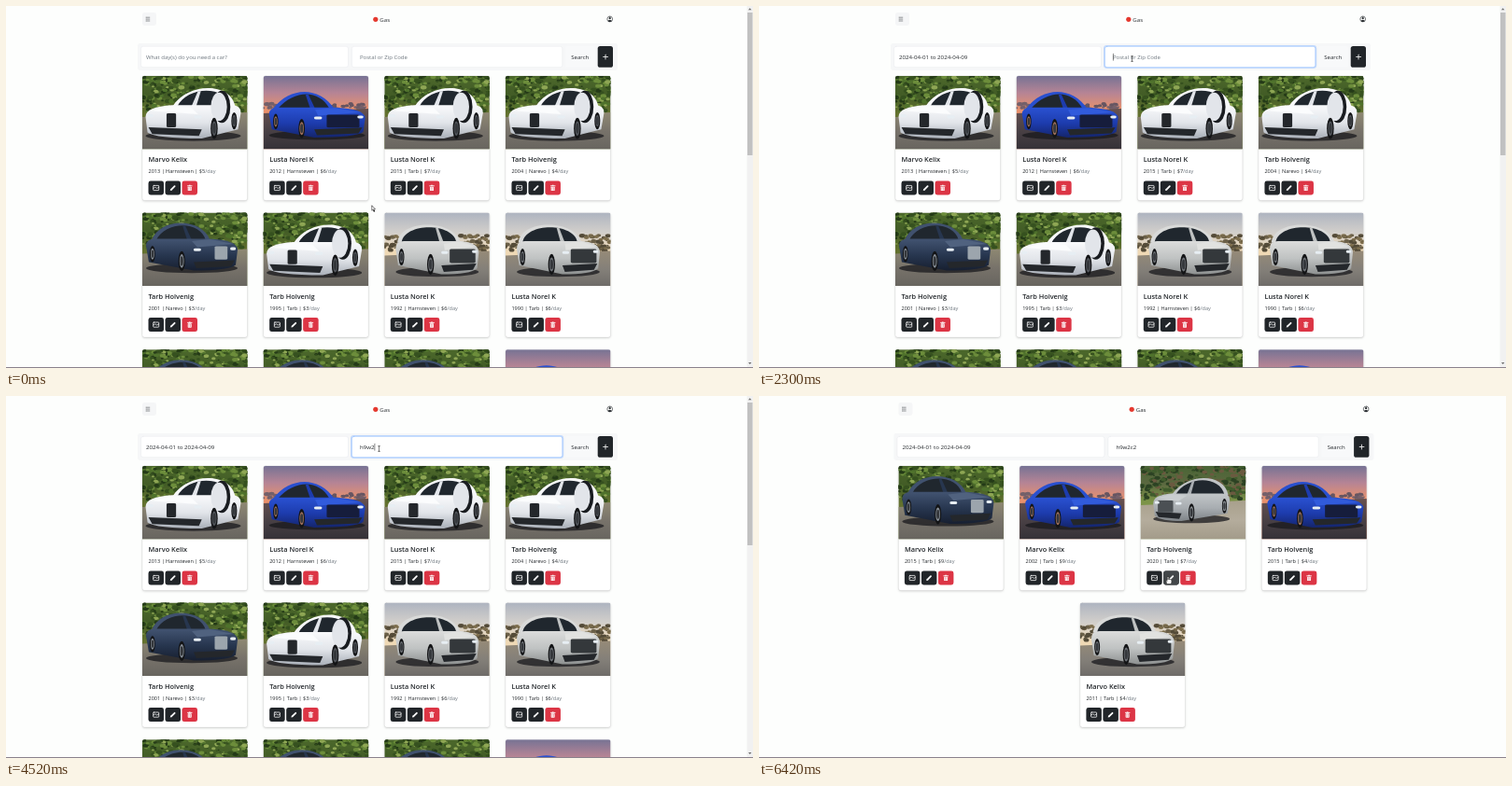
An HTML page with a canvas for the animation above (6.45 s loop, 800x388 px).

```html
<!DOCTYPE html>
<html lang="en">
<head>
<meta charset="utf-8">
<title>Car rental search</title>
<style>
html, body { margin: 0; width: 100%; height: 100%; overflow: hidden; background: #fdfefd; }
canvas { display: block; width: 800px; height: 388px; }
</style>
</head>
<body>
<canvas id="stage"></canvas>
<script>
const W = 800, H = 388, LOOP = 6450;
const DARK = '#212529', RED = '#dc3545', BLUE = '#569ff7', GREY = '#6c757d';
const dpr = window.devicePixelRatio || 1;
const stage = document.getElementById('stage');
let g = setup(stage);

function setup(canvas) {
  canvas.width = W * dpr;
  canvas.height = H * dpr;
  const c = canvas.getContext('2d');
  c.scale(dpr, dpr);
  return c;
}

// ---------- drawing helpers ----------
function text(str, x, y, size, color = DARK, weight = 400, align = 'left') {
  g.font = `${weight} ${size}px "Open Sans", "Noto Sans", sans-serif`;
  g.fillStyle = color;
  g.textAlign = align;
  g.fillText(str, x, y);
  return g.measureText(str).width;
}
function box(x, y, w, h, r, fill, line, lw = 0.5) {
  g.beginPath();
  g.roundRect(x, y, w, h, r);
  if (fill) { g.fillStyle = fill; g.fill(); }
  if (line) { g.strokeStyle = line; g.lineWidth = lw; g.stroke(); }
}
function oval(x, y, rx, ry, fill) {
  g.beginPath();
  g.ellipse(x, y, rx, ry, 0, 0, 7);
  g.fillStyle = fill;
  g.fill();
}
function trace(p) {
  g.beginPath();
  for (let i = 0; i < p.length; i += 2) g.lineTo(p[i], p[i + 1]);
}
function poly(fill, ...p) {
  trace(p);
  g.closePath();
  g.fillStyle = fill;
  g.fill();
}
function line(color, lw, ...p) {
  trace(p);
  g.strokeStyle = color;
  g.lineWidth = lw;
  g.lineJoin = g.lineCap = 'round';
  g.stroke();
}
function fade(y0, y1, colors) {
  const f = g.createLinearGradient(0, y0, 0, y1);
  colors.forEach((c, i) => f.addColorStop(i / (colors.length - 1), c));
  return f;
}
function shadow(blur, alpha, dy) {
  g.shadowBlur = blur * dpr;
  g.shadowOffsetY = dy * dpr;
  g.shadowColor = `rgba(0,0,0,${alpha})`;
}
function noShadow() { g.shadowColor = 'transparent'; }

function random(seed) {
  return () => (seed = (seed * 16807) % 2147483647) / 2147483647;
}

// ---------- pictures: one scene and one car, shaped by a few settings ----------
const PW = 112.5, PH = 78.5;
const FOREST = {
  sky: ['#4c682b', '#425c26', '#64722f'], ground: ['#8d8772', '#77726a', '#68655f'], horizon: 40,
  trees: ['#243a17', '#36511f', '#4f722c', '#6c8d3b', '#8ea654'], top: 0
};
const SUNSET = {
  sky: ['#777394', '#b58495', '#e8916c'], ground: ['#66504f', '#4a4145', '#353137'], horizon: 36,
  trees: ['#74606a', '#665561'], top: 29
};
const FIELD = {
  sky: ['#aeb4c0', '#d2cfcb', '#efd9b5'], ground: ['#958a78', '#848079', '#6f6c69'], horizon: 42,
  trees: ['#544b38', '#6b6048', '#7c6d4c'], top: 24
};
const YARD = {
  sky: ['#4a6535', '#5b6840', '#7c9448'], ground: ['#a9a18d', '#b4ac9c', '#a39b8a'], horizon: 38,
  trees: ['#2c4223', '#405c2d', '#6b5a40'], top: 0
};

// Cars face right unless flipped; roof, hood, belt and wheel are fractions of the car's own box.
const PICS = {
  coupe: {
    scene: FOREST, flip: true, x: 7, y: 13, w: 102, h: 54, belt: 0.37, tail: 0.06, roof: [0.1, 0.56],
    hood: 0.72, wheel: 0.28, paint: ['#f7f8fa', '#e2e5ea', '#a9afb8'], light: '#fbfcfd',
    grille: '#24272b', gx: 0.68, gw: 0.1, rim: '#50545a', scoop: 0.2
  },
  sedan: {
    scene: SUNSET, x: 6, y: 17, w: 103, h: 49, belt: 0.37, tail: 0.04, roof: [0.22, 0.52],
    hood: 0.68, wheel: 0.34, paint: ['#2950cf', '#1d3cae', '#14256c'], light: '#315bdc',
    grille: '#161d3c', gx: 0.6, gw: 0.34, rim: '#a0715d'
  },
  saloon: {
    scene: FOREST, x: 4, y: 11, w: 98, h: 51, belt: 0.36, tail: 0.06, roof: [0.16, 0.6],
    hood: 0.7, wheel: 0.39, paint: ['#40516e', '#27364f', '#171f30'], light: '#50627f',
    grille: '#9ca5ad', gx: 0.75, gw: 0.14, rim: '#8a929b'
  },
  suv: {
    scene: FIELD, x: 12, y: 13, w: 89, h: 53, belt: 0.36, tail: 0.02, roof: [0.05, 0.7],
    hood: 0.78, wheel: 0.42, paint: ['#d9dad9', '#bfc2c2', '#8d9090'], light: '#e1e2e0',
    grille: '#34383b', gx: 0.65, gw: 0.31, rim: '#6d7176'
  },
  hatch: {
    scene: YARD, flip: true, x: 17, y: 13, w: 82, h: 46, belt: 0.39, tail: 0.02, roof: [0.08, 0.56],
    hood: 0.76, wheel: 0.5, paint: ['#c0c4c6', '#a8adb1', '#7e8387'], light: '#c9cdcf',
    grille: '#4b5054', gx: 0.74, gw: 0.2, rim: '#8b9094'
  }
};

function drawScene({ sky, ground, horizon, trees, top }) {
  g.fillStyle = fade(0, horizon, sky);
  g.fillRect(0, 0, PW, PH);
  const rnd = random(97);
  for (let i = 0; i < (horizon - top) * 9; i++) {
    const x = rnd() * PW, y = top + rnd() * (horizon - top), r = 0.6 + rnd() * 1.6;
    oval(x, y, r * 1.5, r, trees[Math.floor(rnd() * trees.length)]);
  }
  poly(fade(horizon, PH, ground), 0, horizon + 4, PW, horizon - 1, PW, PH, 0, PH);
}

function wheel(x, y, size, rim) {
  oval(x, y, size * 0.33, size, '#131416');
  oval(x, y, size * 0.22, size * 0.68, rim);
  oval(x, y, size * 0.15, size * 0.48, '#35383c');
}

function cabin({ tail, roof, hood, belt }, inset, fill) {
  const peak = belt - (belt - inset) / 0.75;
  g.beginPath();
  g.moveTo(tail + inset, belt);
  g.bezierCurveTo(roof[0] + inset, peak, roof[1], peak, hood - inset, belt);
  g.fillStyle = fill;
  g.fill();
}

function drawCar(c) {
  const { belt, hood, paint } = c, corner = c.wheel + 0.13;
  g.save();
  if (c.flip) { g.translate(PW, 0); g.scale(-1, 1); }
  g.translate(c.x, c.y);
  g.scale(c.w, c.h);
  oval(0.5, 0.95, 0.5, 0.1, 'rgba(25,25,28,.75)');
  cabin(c, 0, paint[0]);
  cabin(c, 0.05, '#20272e');
  poly(paint[1], hood - 0.3, 0.06, hood - 0.27, 0.06, hood - 0.2, belt, hood - 0.25, belt);

  g.beginPath();
  g.moveTo(0, belt + 0.12);
  g.quadraticCurveTo(0, belt - 0.03, 0.1, belt - 0.03);
  g.lineTo(hood, belt - 0.03);
  g.quadraticCurveTo(1, belt, 1, belt + 0.2);
  g.lineTo(0.98, 0.88);
  g.quadraticCurveTo(0.9, 1, corner, 1);
  g.lineTo(0.03, 0.82);
  g.fillStyle = fade(belt, 1, paint);
  g.fill();

  poly(c.light, hood - 0.2, belt + 0.02, hood, belt - 0.02, 0.96, belt + 0.08, corner + 0.04, belt + 0.15);
  poly('#24272b', corner, 0.82, 0.97, 0.78, 0.93, 0.91, corner + 0.03, 0.95);
  box(c.gx, belt + 0.13, c.gw, 0.28, 0.02, c.grille);
  box(corner, belt + 0.17, 0.08, 0.06, 0.02, '#e7eef3');
  box(0.92, belt + 0.15, 0.06, 0.06, 0.02, '#e7eef3');
  if (c.scoop) {
    oval(c.scoop, belt, 0.09, 0.32, '#191c20');
    oval(c.scoop + 0.03, belt, 0.085, 0.28, paint[1]);
  }
  g.restore();

  const at = f => (c.flip ? PW - c.x - f * c.w : c.x + f * c.w);
  wheel(at(0.07), c.y + c.h * 0.65, c.h * 0.17, c.rim);
  wheel(at(c.wheel), c.y + c.h * 0.8, c.h * 0.21, c.rim);
}

// ---------- cards ----------
const KELIX = 'Marvo Kelix', NOREL = 'Lusta Norel K', TARB = 'Tarb Holvenig';
const FLEET = [
  ['coupe', KELIX, '2013 | Harnsteven | $5'], ['sedan', NOREL, '2012 | Harnsteven | $6'],
  ['coupe', NOREL, '2015 | Tarb | $7'], ['coupe', TARB, '2004 | Narevo | $4'],
  ['saloon', TARB, '2001 | Narevo | $3'], ['coupe', TARB, '1995 | Tarb | $3'],
  ['suv', NOREL, '1992 | Harnsteven | $6'], ['suv', NOREL, '1990 | Tarb | $6'],
  ['saloon'], ['saloon'], ['saloon'], ['sedan']
];
const FOUND = [
  ['saloon', KELIX, '2015 | Tarb | $9'], ['sedan', KELIX, '2002 | Tarb | $9'],
  ['hatch', TARB, '2020 | Tarb | $7'], ['sedan', TARB, '2015 | Tarb | $4'],
  ['suv', KELIX, '2011 | Tarb | $4']
];

function pictureIcon(x, y) {
  box(x - 3, y - 2.6, 6, 5.2, 0.6, null, '#fff', 0.75);
  line('#fff', 0.7, x - 3, y + 0.4, x - 1, y - 0.7, x + 1, y + 0.4, x + 3, y - 0.7);
}
function pencilIcon(x, y) {
  line('#fff', 1.8, x - 1.5, y + 1.6, x + 1.9, y - 1.8);
  poly('#fff', x - 3, y + 3, x - 2.3, y + 0.7, x - 0.7, y + 2.3);
}
function trashIcon(x, y) {
  line('#fff', 0.9, x - 2.4, y - 2.2, x + 2.4, y - 2.2);
  box(x - 0.9, y - 3.2, 1.8, 1, 0.3, '#fff');
  box(x - 2, y - 1.3, 4, 4.4, 0.6, '#fff');
  for (const d of [-0.8, 0.8]) line(RED, 0.4, x + d, y - 0.5, x + d, y + 2.2);
}
function button(x, y, fill, icon) {
  box(x, y, 16.5, 15, 2.4, fill);
  icon(x + 8.2, y + 7.5);
}

function card(x, y, [pic, title, info]) {
  shadow(2.5, 0.16, 1);
  box(x, y, PW, 133.5, 2.4, '#fff');
  noShadow();
  box(x, y, PW, 133.5, 2.4, null, 'rgba(0,0,0,.14)', 0.4);
  g.save();
  g.beginPath();
  g.roundRect(x, y, PW, PH, [2.2, 2.2, 0, 0]);
  g.clip();
  g.translate(x, y);
  drawScene(PICS[pic].scene);
  drawCar(PICS[pic]);
  g.restore();
  if (!title) return;
  const left = x + 6.5;
  text(title, left, y + 92.2, 7.35, DARK, 600);
  const w = text(info, left, y + 104.3, 5.55);
  text('/day', left + w, y + 104.3, 5.55, GREY);
  [pictureIcon, pencilIcon, trashIcon].forEach((icon, i) =>
    button(left + i * 18, y + 112.5, icon === trashIcon ? RED : DARK, icon));
}

function paintPage(cards, dx, scrolls) {
  g.fillStyle = '#fdfefd';
  g.fillRect(0, 0, W, H);
  g.save();
  g.translate(dx, 0);
  box(146, 7, 15, 14, 2.4, '#f5f6f7');
  for (let y = 12.2; y < 17; y += 1.9) line('#4d5256', 0.6, 149.8, y, 153.8, y);
  oval(395.8, 14.3, 2.6, 2.6, '#e5392f');
  text('Gas', 400.3, 16.6, 6.1);
  box(643.8, 11.1, 5.8, 5.8, 2.9, null, DARK, 0.6);
  oval(646.7, 13.2, 1.1, 1.1, DARK);
  oval(646.7, 15.9, 1.9, 1, DARK);
  box(141, 40, 514, 29, 2.4, '#f6f7f8');
  box(633.7, 43, 16.3, 22.8, 2.6, DARK);
  line('#fff', 0.8, 639.5, 54.5, 644.5, 54.5);
  line('#fff', 0.8, 642, 52, 642, 57);
  box(599, 43, 32, 22.8, 2.4, '#f8f9fa');
  text('Search', 605.3, 56.8, 6);
  cards.forEach((c, i) => {
    const row = Math.floor(i / 4), alone = cards.length - row * 4 === 1;
    card(alone ? 340.5 : 146 + (i % 4) * 129.65, 75 + row * 146.6, c);
  });
  g.restore();
  if (scrolls) {
    box(793.5, 0, 6.5, H, 0, '#f1f1f1');
    box(794, 7, 5.5, 153, 0, '#c1c1c1');
    for (const [y, d] of [[4.2, -2], [382, 2]]) poly('#6b6b6b', 795, y, 798.4, y, 796.7, y + d);
  }
  g.fillStyle = '#8a818c';
  g.fillRect(0, 387, W, 1);
}

function layer(paint) {
  const canvas = document.createElement('canvas'), main = g;
  g = setup(canvas);
  paint();
  g = main;
  return canvas;
}
const before = layer(() => paintPage(FLEET, 0, true));
const after = layer(() => paintPage(FOUND, 3.4, false));

// ---------- timeline ----------
const OPEN = 540, PICK = 1120, CLOSE = 1700, FOCUS = 2230, BLUR = 5560, RESULT = 5900;
const ZIP = 'h9w2c2', TYPE = 2950, KEY_GAP = 440;
const HOME = { x: 391.8, y: 214 };
const MOVES = [
  { from: 0, to: 460, x: 262, y: 56 },
  { from: 600, to: 1060, x: 289, y: 99 },
  { from: 1180, to: 1420, x: 307, y: 106.3 },
  { from: 1440, to: 1580, x: 306.5, y: 113 },
  { from: 1740, to: 2180, x: 399.5, y: 56.5 },
  { from: 5120, to: 5480, x: 612.3, y: 56.5 },
  { from: 5920, to: 6390, x: 438, y: 193.5 }
];

function pointer(t) {
  let { x, y } = HOME;
  for (const m of MOVES) {
    const u = Math.max(0, Math.min(1, (t - m.from) / (m.to - m.from))), e = u * u * (3 - 2 * u);
    x += (m.x - x) * e;
    y += (m.y - y) * e;
  }
  return [x, y];
}

// ---------- calendar ----------
const COL = 17.25, ROW = 15.6;
const cellX = (m, d) => (m ? 272.4 : 152.1) + d * COL;
const cellY = r => 99 + r * ROW;

function dayUnder(x, y) {
  const c = Math.round((x - cellX(1, 0)) / COL), r = Math.round((y - cellY(0)) / ROW);
  const day = r * 7 + c;
  return c >= 0 && c < 7 && r >= 0 && day >= 1 && day <= 30 ? day : 0;
}

function month(m, name, mid) {
  const wide = text(name, mid - 20, 77.3, 7, '#1a1a1a', 700);
  text('2024', mid - 18 + wide, 77.3, 6.8, '#555', 300);
  ['Sun', 'Mon', 'Tue', 'Wed', 'Thu', 'Fri', 'Sat'].forEach((d, i) =>
    text(d, cellX(m, i), 87.2, 4.6, '#666', 700, 'center'));
}

function calendar(picked, hover) {
  shadow(5, 0.18, 1);
  box(143.7, 66.5, 242, 118.3, 2, '#fff');
  noShadow();
  box(143.7, 66.5, 242, 118.3, 2, null, '#e4e4e4', 0.5);
  month(0, 'March', 202.3);
  month(1, 'April', 326);
  line('#555', 0.7, 377.3, 73.6, 379.5, 75.9, 377.3, 78.2);

  for (let d = 24; d <= 31; d++) {
    const x = cellX(0, (d - 24) % 7), y = cellY(d < 31 ? 4 : 5);
    if (d === 24) box(x - 7.5, y - 7.5, 15, 15, 7.5, null, '#959ea9', 0.5);
    text(d, x, y + 2, 5.2, '#555', 400, 'center');
  }
  const last = Math.max(1, hover);
  for (let d = 1; d <= 30; d++) {
    const x = cellX(1, d % 7), y = cellY(Math.floor(d / 7));
    const end = picked && (d === 1 || d === last);
    if (end) {
      const l = d === 1 ? 7.6 : 0, r = d === last ? 7.6 : 0;
      box(x - 8.6, y - 7.6, COL, 15.2, [l, r, r, l], BLUE);
    } else if (picked && d < last) {
      box(x - 8.6, y - 7.6, COL, 15.2, 0, '#e6e6e6');
    } else if (d === hover) {
      box(x - 7.6, y - 7.6, 15.2, 15.2, 7.6, '#e6e6e6');
    }
    text(d, x, y + 2, 5.2, end ? '#fff' : '#444', 400, 'center');
  }
}

// ---------- search fields ----------
function field(x, w, focus) {
  if (focus) box(x - 1.4, 42, w + 2.8, 25, 3.4, '#c4dafc');
  box(x, 43.3, w, 22.4, 2.4, '#fff', focus ? '#86b7fe' : '#e6e9ec', 0.5);
}

function fields(t) {
  const focus = t >= FOCUS && t < BLUR;
  field(144.5, 222, false);
  field(370.4, 225.4, focus);

  if (t < PICK) text('What day(s) do you need a car?', 150, 56.8, 6, GREY);
  else text(t < CLOSE ? '2024-04-01' : '2024-04-01 to 2024-04-09', 150, 56.8, 6.15);

  const count = Math.max(0, Math.min(ZIP.length, Math.floor((t - TYPE) / KEY_GAP) + 1));
  let w = 0;
  if (count) w = text(ZIP.slice(0, count), 379, 56.8, 6.1);
  else text('Postal or Zip Code', 379, 56.8, 6, GREY);
  const since = t - (count ? TYPE + (count - 1) * KEY_GAP : FOCUS);
  if (focus && since % 1060 < 530) line('#222', 0.55, 379.4 + w, 51.2, 379.4 + w, 58.2);
}

// ---------- mouse ----------
function mouse(kind, x, y) {
  g.save();
  g.translate(x, y);
  if (kind === 'arrow') {
    line('#222', 1.6, 1.2, 3, 2.5, 5.8);
    poly('#fff', 0, 0, 0, 5.2, 3.7, 3.7);
    line('#222', 0.6, 0, 0, 0, 5.2, 1.4, 4.1, 3.7, 3.7, 0, 0);
  } else if (kind === 'hand') {
    box(-1.8, 3, 5.6, 5, 1.6, '#fff', '#222', 0.6);
    box(-0.7, 0, 1.5, 5, 0.7, '#fff', '#222', 0.6);
    box(-0.4, 3.4, 3.6, 3.6, 0.6, '#fff');
  } else {
    line('#333', 0.6, 0, -2.8, 0, 2.8);
    for (const d of [-2.8, 2.8]) line('#333', 0.6, -1, d, 1, d);
  }
  g.restore();
}

function frame(now) {
  const t = now % LOOP, done = t >= RESULT, open = t >= OPEN && t < CLOSE;
  const [x, y] = pointer(t), hover = open ? dayUnder(x, y) : 0;
  g.drawImage(done ? after : before, 0, 0, W, H);
  g.save();
  if (done) g.translate(3.4, 0);
  fields(t);
  g.restore();
  if (open) calendar(t >= PICK, hover);

  const onEdit = done && x > 433.5 && x < 450 && y > 187.5 && y < 202.5;
  if (onEdit) button(433.2, 187.5, '#424649', pencilIcon);
  const onBar = y > 43 && y < 66;
  let kind = 'arrow';
  if (hover || onEdit || (onBar && x > 599 && x < 650)) kind = 'hand';
  else if (onBar && x > 144 && x < 596) kind = 'beam';
  mouse(kind, x, y);
}

const start = performance.now();
(function tick() {
  frame(performance.now() - start);
  requestAnimationFrame(tick);
})();
</script>
</body>
</html>
```
